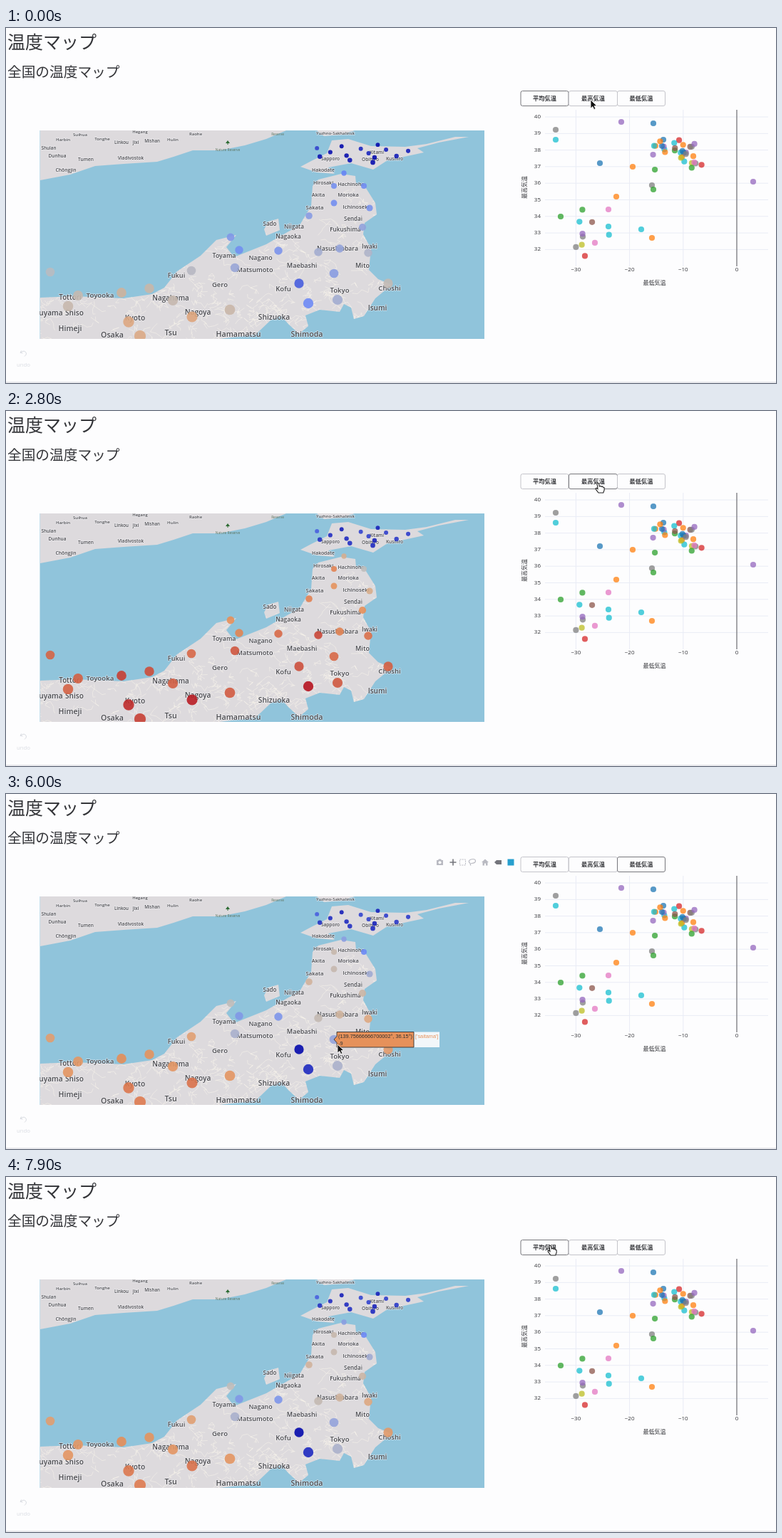
Write an HTML page with a canvas that moves like this. It is 1080 px wide and 499 px high and loops after 8 s.

```html
<!DOCTYPE html>
<html lang="ja">
<head>
<meta charset="utf-8">
<style>
html, body { margin: 0; width: 100%; height: 100%; overflow: hidden; background: #fdfdfe; }
canvas { display: block; }
</style>
</head>
<body>
<canvas id="stage" width="1080" height="499"></canvas>
<script>
const ctx = document.getElementById('stage').getContext('2d');
const LOOP = 8000, PAGE = '#fdfdfe', SEA = '#90c4db', LAND = '#dddadd', INK = '#333438', GRID = '#e9ecf5';
const JP = '"Noto Sans CJK JP", "Noto Sans CJK", sans-serif';
const LATIN = '"Open Sans", sans-serif';
const ARIAL = '"Liberation Sans", Arial, sans-serif';

let seed = 7;
const rnd = () => (seed = seed * 16807 % 2147483647) / 2147483647;
const spread = () => rnd() + rnd() + rnd() - 1.5;
const clamp = v => Math.min(1, Math.max(0, v));

const coasts = [
  'M48 144H393L365 156 335 165 300 172 262 172 235 181 212 188 165 191 125 194 90 206 48 214Z',
  'M436 144H489L470 150 446 152Z',
  'M457 158L480 156 512 166 560 167 590 163 630 153 649 153 607 161 577 169 586 175 535 186 515 199 484 190 452 196 461 205 436 203 413 195 428 187 450 176Z',
  `M430 222L438 213 470 205 490 208 491 219 503 222 518 246 520 262 503 274 501 290 512 310 509 340 522 353 541 361
   518 380 502 405 488 409 484 393 474 388 468 399 440 396 420 404 424 419 411 430 396 416 386 405 372 410 350 431 300 437
   H48V379L95 377 165 380 205 374 222 365 240 342 273 320 295 298 323 291 309 308 320 322 365 304 412 277 428 250Z`,
  'M362 283L368 272 382 268 384 284 365 292Z'
];
const land = new Path2D(coasts.join(''));

const roads = new Path2D();
for (let i = 0; i < 420; i++) {
  let x = 48 + rnd() * 490, y = 210 + 230 * Math.pow(rnd(), 0.6);
  roads.moveTo(x, y);
  for (let k = 0; k < 4; k++) roads.lineTo(x += (rnd() - 0.5) * 18, y += (rnd() - 0.5) * 14);
}

const towns = [
  ['Harbin', 80, 157], ['Suihua', 104, 150], ['Tonghe', 135, 156], ['Hegang', 188, 146], ['Linkou', 162, 161],
  ['Jixi', 182, 161], ['Mishan', 205, 159], ['Hulin', 234, 157], ['Raohe', 266, 149], ['Shulan', 60, 169],
  ['Dunhua', 72, 180], ['Tumen', 112, 185], ['Vladivostok', 175, 183], ['Chŏngjin', 84, 200],
  ['Yuzhno-Sakhalinsk', 462, 148], ['Sapporo', 455, 184], ['Kitami', 520, 175], ['Obihiro', 511, 185],
  ['Kushiro', 545, 184], ['Hakodate', 445, 200], ['Hirosaki', 445, 218], ['Hachinohe', 484, 220],
  ['Akita', 438, 235], ['Morioka', 480, 235], ['Sakata', 433, 253], ['Ichinoseki', 491, 252], ['Sendai', 487, 269],
  ['Sado', 370, 276], ['Niigata', 404, 280], ['Fukushima', 476, 284], ['Nagaoka', 396, 294],
  ['Nasushiobara', 465, 311], ['Iwaki', 510, 308], ['Toyama', 306, 321], ['Nagano', 357, 324],
  ['Maebashi', 415, 335], ['Mito', 500, 335], ['Matsumoto', 349, 341], ['Fukui', 239, 349], ['Gero', 300, 362],
  ['Kofu', 389, 367], ['Tokyo', 468, 369], ['Chōshi', 538, 366], ['Tottori', 90, 379], ['Toyooka', 132, 376],
  ['Nagahama', 231, 380], ['Isumi', 521, 394], ['uyama', 63, 401], ['Shiso', 96, 401], ['Kyoto', 181, 408],
  ['Nagoya', 269, 400], ['Shizuoka', 376, 407], ['Himeji', 90, 423], ['Osaka', 149, 432], ['Tsu', 231, 429],
  ['Hamamatsu', 326, 431], ['Shimoda', 422, 431]
];

// Red-blue scale: stop, r, g, b
const scale = [
  [0, 5, 10, 172], [0.35, 106, 137, 247], [0.5, 190, 190, 190], [0.6, 220, 170, 132], [0.7, 230, 145, 90], [1, 178, 10, 28]
];
function heat(v) {
  const i = Math.max(1, scale.findIndex(stop => stop[0] >= v));
  const a = scale[i - 1], b = scale[i], p = (v - a[0]) / (b[0] - a[0]);
  return `rgb(${[1, 2, 3].map(k => Math.round(a[k] + (b[k] - a[k]) * p))})`;
}

// Warmth (mean, highest, lowest) from latitude, highlands and a little noise
function warmth(x, y) {
  const noise = spread() * 0.1;
  if (y < 200) return [0.04, 0.12, 0.12].map(v => clamp(v + noise));
  const south = (y - 220) / 200;
  const hill = (cx, cy, size) => Math.exp(-((x - cx) ** 2 + (y - cy) ** 2) / size ** 2);
  const basin = hill(415, 370, 45), alps = hill(350, 330, 38);
  const seaWind = Math.max(0, x - 460) * Math.exp((222 - y) / 40);
  return [
    0.34 + 0.24 * south - 0.25 * basin - 0.12 * alps + noise / 2,
    0.67 + 0.19 * south + 0.12 * basin - 0.005 * seaWind + noise,
    0.5 + 0.23 * south - 0.75 * basin - 0.35 * alps - 0.004 * seaWind + noise / 2
  ].map(clamp);
}

const sites = [
  [474, 204], [460, 222], [502, 222], [460, 246], [510, 253], [425, 264], [500, 280], [315, 294], [327, 312],
  [382, 313], [438, 315], [468, 310], [508, 316], [62, 343], [321, 337], [260, 341], [460, 345], [411, 359],
  [536, 359], [201, 366], [162, 372], [101, 376], [87, 391], [234, 383], [465, 382], [424, 387], [314, 396],
  [261, 406], [172, 413], [188, 433]
];
for (let i = 0; i < 14; i++) {
  const r = Math.sqrt((i + 0.5) / 14), a = i * 2.4;
  sites.push([495 + 72 * r * Math.cos(a), 176 + 15 * r * Math.sin(a)]);
}
const stations = sites.map(([x, y]) => ({ x, y, r: 2.8 + (y - 160) * 0.0193, v: warmth(x, y) }));

// Lone points first, then seeded clusters: count, centre, spread
const cloud = [
  [771, 143], [771, 157], [863, 132], [908, 134], [1048, 216], [778, 265], [833, 190],
  [879, 195], [856, 237], [891, 283], [906, 295], [906, 221], [908, 227], [845, 255], [845, 279]
];
for (const [n, cx, cy, sx, sy] of [[22, 955, 175, 22, 22], [10, 914, 172, 16, 20], [10, 816, 290, 22, 32]])
  for (let i = 0; i < n; i++) cloud.push([cx + sx * spread(), cy + sy * spread()]);
const hues = ['#7f7f7f', '#17becf', '#9467bd', '#1f77b4', '#9467bd', '#2ca02c', '#1f77b4', '#ff7f0e', '#ff7f0e',
  '#17becf', '#ff7f0e', '#7f7f7f', '#2ca02c', '#e377c2', '#17becf', '#d62728', '#bcbd22', '#8c564b'];

const buttons = [['平均気温', 722, 67], ['最高気温', 789.5, 68], ['最低気温', 857.5, 67]];

// Pointer stops: time, x, y
const route = [
  [0, 820, 101], [300, 830, 101], [3400, 830, 101], [4000, 894, 94], [5200, 894, 94], [5800, 465, 352],
  [6300, 465, 352], [6600, 410, 357], [7000, 410, 357], [7600, 763, 96], [LOOP, 763, 96]
];
const arrow = new Path2D('M0 0V12L2.9 9.4 4.8 13.5 6.9 12.5 5 8.6H8.8Z');
const hand = new Path2D('M-1 1Q.3-.6 1.5 1L2.2 5 4 4.3 5 5.4 6.8 5 7.5 6.3 9 6.4 9.2 10 7.8 14H1L-2.5 9.4Q-3.6 7.4-1.8 7.3L0 8.6Z');

function text(str, x, y, font, color, align = 'center', halo) {
  ctx.font = font;
  ctx.textAlign = align;
  ctx.textBaseline = 'middle';
  if (halo) {
    ctx.strokeStyle = halo;
    ctx.lineWidth = 1.6;
    ctx.strokeText(str, x, y);
  }
  ctx.fillStyle = color;
  ctx.fillText(str, x, y);
}
function shape(d, fill, stroke, width = 1) {
  const path = d instanceof Path2D ? d : new Path2D(d);
  if (fill) { ctx.fillStyle = fill; ctx.fill(path); }
  if (stroke) { ctx.strokeStyle = stroke; ctx.lineWidth = width; ctx.stroke(path); }
}
function disc(x, y, r, color) {
  ctx.fillStyle = color;
  ctx.beginPath();
  ctx.arc(x, y, r, 0, Math.PI * 2);
  ctx.fill();
}

function drawMap(mode) {
  ctx.save();
  ctx.beginPath();
  ctx.rect(47.5, 144, 623.5, 293);
  ctx.clip();
  ctx.fillStyle = SEA;
  ctx.fillRect(47, 144, 625, 294);
  shape(land, LAND);
  ctx.save();
  ctx.clip(land);
  shape(roads, null, 'rgba(250,246,236,.6)', 0.8);
  ctx.restore();

  ctx.lineJoin = 'round';
  for (const [name, x, y] of towns)
    text(name, x, y, `600 ${6 + (y - 150) * 0.0165}px ${LATIN}`, '#4a4a4e', 'center', 'rgba(245,245,248,.6)');
  text('Nature Reserve', 311, 172, `4.8px ${LATIN}`, '#5d7560');
  text('Reserve', 381, 150, `4.8px ${LATIN}`, '#5d7560');
  shape('M311 158L314 162H308ZM310.5 161H311.5V164H310.5Z', '#2c6b32');

  ctx.globalAlpha = 0.9;
  for (const s of stations) disc(s.x, s.y, s.r, heat(s.v[mode]));
  ctx.restore();
}

function drawChart() {
  const small = `8px ${LATIN}`, label = `8px ${JP}`;
  const px = v => 1025 + v * 7.52, py = v => 125 + (40 - v) * 23.3;
  for (let v = 32; v <= 40; v++) {
    shape(`M756 ${py(v)}H1069`, null, GRID);
    text(v, 750, py(v), small, INK, 'right');
  }
  for (let v = -30; v <= 0; v += 10) {
    shape(`M${px(v)} 115V335`, null, v ? GRID : '#77777a', v ? 1 : 1.3);
    text(String(v).replace('-', '−'), px(v), 340, small, INK);
  }
  text('最低気温', 909.5, 358, label, INK);
  ctx.save();
  ctx.translate(727, 224);
  ctx.rotate(-Math.PI / 2);
  text('最高気温', 0, 0, label, INK);
  ctx.restore();
  ctx.globalAlpha = 0.75;
  cloud.forEach(([x, y], i) => disc(x, y, 4.1, hues[i % hues.length]));
  ctx.globalAlpha = 1;
}

function drawButtons(active) {
  buttons.forEach(([name, x, w], i) => {
    ctx.beginPath();
    ctx.roundRect(x, 88.5, w, 21, 2.5);
    ctx.strokeStyle = i === active ? '#77777c' : '#c4c4ca';
    ctx.lineWidth = 1;
    ctx.stroke();
    text(name, x + w / 2, 99, `bold 8.2px ${JP}`, INK);
  });
}

function drawToolbar() {
  const pale = '#b9bac2', dark = '#74757c';
  shape('M604 93H606L607 91.5H610L611 93H613V100H604Z', pale);
  disc(608.5, 96.3, 2, PAGE);
  shape('M622.5 96H631.5M627 91.5V100.5', null, dark, 1.6);
  ctx.setLineDash([2, 1.2]);
  shape('M636.5 92H644.5V100H636.5Z', null, pale);
  ctx.setLineDash([]);
  shape('M651 97.5C647 94 651 91.5 655 91.5S661 97 653 97.5Q650 98 652 100.5', null, pale, 1.2);
  shape('M667 96L672 91.5 677 96H675.5V100.5H673V97.5H671V100.5H668.5V96Z', pale);
  shape('M685 96L688 93H695V99H688Z', dark);
  shape('M703.5 91.5H712.5V100.5H703.5Z', '#279fce');
}

function drawTip(x, y, w, extra, [place, value, name], v, ink) {
  const font = `7.3px ${ARIAL}`, fill = heat(v);
  ctx.fillStyle = 'rgba(253,253,254,.9)';
  ctx.fillRect(x + w, y, extra, 21.5);
  shape(`M${x} ${y}h${w}v21.5h${-w}v-6.5l-4-4.5 4-4.5Z`, fill, ink, 0.9);
  text(place, x + 2, y + 6.5, font, ink, 'left');
  text(value, x + 2, y + 16, font, ink, 'left');
  text(name, x + w + 2, y + 6.5, font, fill, 'left');
}

function pointerAt(t) {
  const i = route.findIndex(stop => stop[0] > t);
  const [t0, x0, y0] = route[i - 1], [t1, x1, y1] = route[i];
  const p = (t - t0) / (t1 - t0), e = p * p * (3 - 2 * p);
  return [x0 + (x1 - x0) * e, y0 + (y1 - y0) * e];
}

function draw(t) {
  ctx.fillStyle = PAGE;
  ctx.fillRect(0, 0, 1080, 499);
  text('温度マップ', 2, 19, `25px ${JP}`, INK, 'left');
  text('全国の温度マップ', 2, 61.5, `19.7px ${JP}`, INK, 'left');

  drawMap(t < 1700 ? 0 : t < 5200 ? 1 : 2);
  drawChart();
  drawButtons(t < 500 ? 0 : t < 4200 ? 1 : t < 7700 ? 2 : 0);

  shape('M21.5 453.5L20 456.5 23.5 457M20.5 456Q26 452 28.5 457 28.5 460 26 461.5', null, '#d9dce2');
  text('undo', 24.5, 474, `7.8px ${LATIN}`, '#d9dce2');
  shape('M0 498H1080', null, '#d5d5dc');

  const [x, y] = pointerAt(t);
  if (x < 715) drawToolbar();
  if (t >= 5800 && t < 6400)
    drawTip(464, 334.5, 108, 36, ['(139.75666666700002°, 36.15°)', '-9', "['saitama']"], 0.7, '#333');
  if (t >= 6500 && t < 7100)
    drawTip(415, 348.5, 120.5, 46, ['(138.938333333°, 35.8616666667°)', '−33.8', "['yamanashi']"], 0, '#fff');

  ctx.save();
  ctx.translate(x, y);
  if (t >= 100 && x > 722 && y < 110) shape(hand, '#fff', '#222', 1.1);
  else shape(arrow, '#111', '#fff', 0.8);
  ctx.restore();
}

function tick() {
  draw(Math.floor(performance.now() % LOOP / 100) * 100);
  requestAnimationFrame(tick);
}
tick();
</script>
</body>
</html>
```
